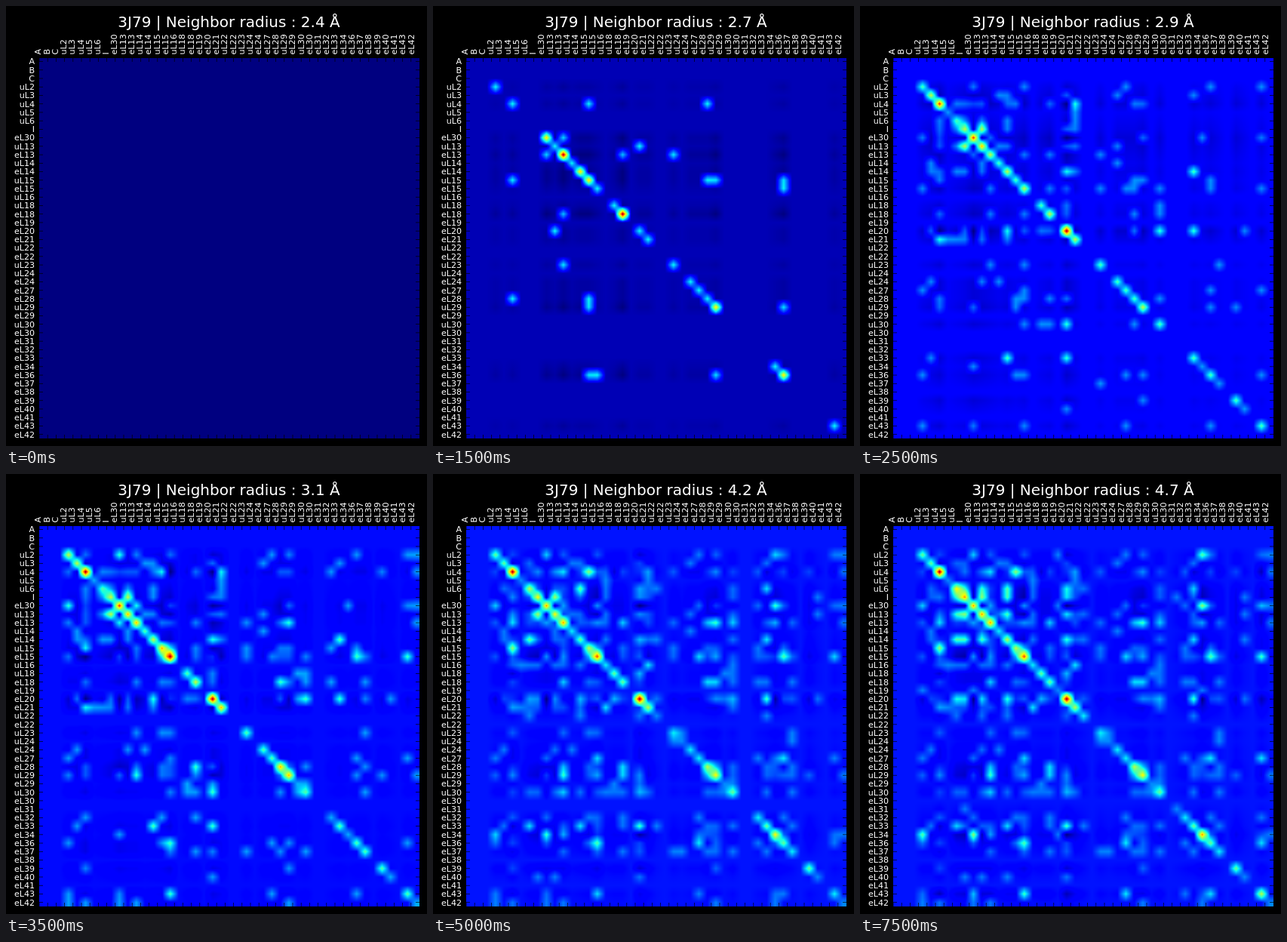
These frames come from a looping animation (558 by 583 pixels, 8000 ms). An HTML page with a canvas:

```html
<!DOCTYPE html>
<html lang="en">
<head>
<meta charset="utf-8">
<title>Neighbor radius</title>
<style>
html, body { margin: 0; height: 100%; overflow: hidden; background: #000; }
canvas { display: block; }
</style>
</head>
<body>
<canvas width="558" height="583"></canvas>
<script>
const ctx = document.querySelector('canvas').getContext('2d');
const names = ('A B C uL2 uL3 uL4 uL5 uL6 I eL30 uL13 eL13 uL14 eL14 uL15 eL15 uL16 uL18 eL18 ' +
  'eL19 eL20 eL21 uL22 eL22 uL23 uL24 eL24 eL27 eL28 uL29 eL29 uL30 eL30 eL31 eL32 eL33 ' +
  'eL34 eL36 eL37 eL38 eL39 eL40 eL41 eL43 eL42').split(' ');
const N = names.length, LEFT = 44, TOP = 69, SIZE = 504, PITCH = 11.23, HOLD = 500;

// Radius and the contacts it adds: each group is a chain followed by its new neighbors.
const steps = [
  ['2.4', ''],
  ['2.5', 'eL14 eL20'],
  ['2.6', 'eL30 eL36, eL18 eL28, eL13 uL15, uL23 uL29'],
  ['2.7', 'eL18 uL4 uL15, eL13 uL29 eL36, eL30 eL15, eL14 uL13, uL2 eL43, eL27 eL34, uL14 eL24, uL18 eL21'],
  ['2.8', 'eL30 uL2, uL4 eL15 eL28, eL20 uL13 eL21 I, eL21 uL30, uL13 eL33, uL3 eL24, uL29 eL15, uL23 eL39'],
  ['2.9', 'eL30 eL27 eL43, uL4 eL20 uL30, eL20 uL6, uL18 uL5, I eL14 eL33, uL3 uL13 uL14, eL39 eL37, uL6 eL40'],
  ['3.0', 'eL28 eL32 uL15, uL15 uL29, uL2 eL15, eL21 eL29'],
  ['3.1', 'eL15 eL42 eL13, uL4 eL37'],
  ['3.2', 'eL20 uL30, eL30 eL34'],
  ['3.3', 'uL16 uL18 eL20, eL39 uL24, I uL22, uL6 uL13'],
  ['4.2', 'eL13 eL20 uL4, uL4 eL33 uL29, eL34 eL36 eL15 eL32, uL6 I'],
  ['4.3', 'I uL13'],
  ['4.4', 'eL43 eL19, uL6 eL14'],
  ['4.5', 'uL22 eL31'],
  ['4.6', ''],
  ['4.7', 'eL34 eL43']
];

const clamp = (v, lo, hi) => Math.max(lo, Math.min(hi, v));

// Piecewise linear ramp through [position, level] points.
function ramp(v, points) {
  for (let i = 1; i < points.length; i++) {
    const [x0, y0] = points[i - 1], [x1, y1] = points[i];
    if (v <= x1) return 255 * (y0 + (y1 - y0) * (v - x0) / (x1 - x0));
  }
  return 255 * points.at(-1)[1];
}
const jet = v => [
  ramp(v, [[0, 0], [.35, 0], [.66, 1], [.89, 1], [1, .5]]),
  ramp(v, [[0, 0], [.125, 0], [.375, 1], [.64, 1], [.91, 0], [1, 0]]),
  ramp(v, [[0, .5], [.11, 1], [.34, 1], [.65, 0], [1, 0]])
];
const palette = Array.from({ length: 1024 }, (_, i) => jet(i / 1023));

function contacts(last) {
  const adj = names.map(() => new Array(N).fill(0));
  for (const [, text] of steps.slice(0, last + 1)) {
    if (!text) continue;
    for (const group of text.split(', ')) {
      const [a, ...rest] = group.split(' ').map(n => names.indexOf(n));
      for (const b of rest) adj[a][b] = adj[b][a] = 1;
    }
  }
  return adj;
}

// Covariance between contact rows, scaled to 0..1.
function covariance(adj) {
  const degree = adj.map(row => row.reduce((a, b) => a + b));
  const cov = adj.map((p, i) => adj.map((q, j) =>
    p.reduce((sum, v, k) => sum + v * q[k], 0) - degree[i] * degree[j] / N));
  const all = cov.flat(), lo = Math.min(...all), span = Math.max(...all) - lo || 1;
  return cov.map(row => row.map(v => (v - lo) / span));
}

function heatmap(grid) {
  const img = ctx.createImageData(SIZE, SIZE);
  const sample = (p, first) => {
    const u = clamp((p - first) / PITCH, 0, N - 1), i = Math.min(Math.floor(u), N - 2);
    return [i, u - i];
  };
  for (let y = 0, o = 0; y < SIZE; y++) {
    const [r, fy] = sample(y + TOP, 73);
    for (let x = 0; x < SIZE; x++, o += 4) {
      const [c, fx] = sample(x + LEFT, 48.8);
      const a = grid[r][c] * (1 - fx) + grid[r][c + 1] * fx;
      const b = grid[r + 1][c] * (1 - fx) + grid[r + 1][c + 1] * fx;
      img.data.set(palette[Math.round((a + (b - a) * fy) * 1023)], o);
      img.data[o + 3] = 255;
    }
  }
  ctx.putImageData(img, LEFT, TOP);
}

function ticks() {
  ctx.fillStyle = '#000';
  for (let i = 0; i < N; i++) {
    const x = LEFT + 11.2 * i - .35, y = 73.2 + PITCH * i;
    ctx.fillRect(x, TOP, .7, 5);
    ctx.fillRect(x, TOP + SIZE - 5, .7, 5);
    ctx.fillRect(LEFT, y, 5, .7);
    ctx.fillRect(LEFT + SIZE - 5, y, 5, .7);
  }
}

function labels(radius) {
  ctx.fillStyle = '#fff';
  ctx.font = '20px "DejaVu Sans", sans-serif';
  ctx.textAlign = 'center';
  ctx.fillText(`3J79 | Neighbor radius : ${radius} Å`, 295.5, 28);
  ctx.font = '11.1px "DejaVu Sans", sans-serif';
  names.forEach((name, i) => {
    ctx.textAlign = 'right';
    ctx.fillText(name, 38, 77.4 + PITCH * i);
    ctx.save();
    ctx.translate(46.4 + PITCH * i, 64.5);
    ctx.rotate(-Math.PI / 2);
    ctx.textAlign = 'left';
    ctx.fillText(name, 0, 0);
    ctx.restore();
  });
}

function draw(step) {
  ctx.fillStyle = '#000';
  ctx.fillRect(0, 0, 558, 583);
  heatmap(covariance(contacts(step)));
  ticks();
  labels(steps[step][0]);
}

let shown = -1;
function frame() {
  const step = Math.floor(performance.now() / HOLD) % steps.length;
  if (step !== shown) draw(shown = step);
  requestAnimationFrame(frame);
}
frame();
</script>
</body>
</html>
```
